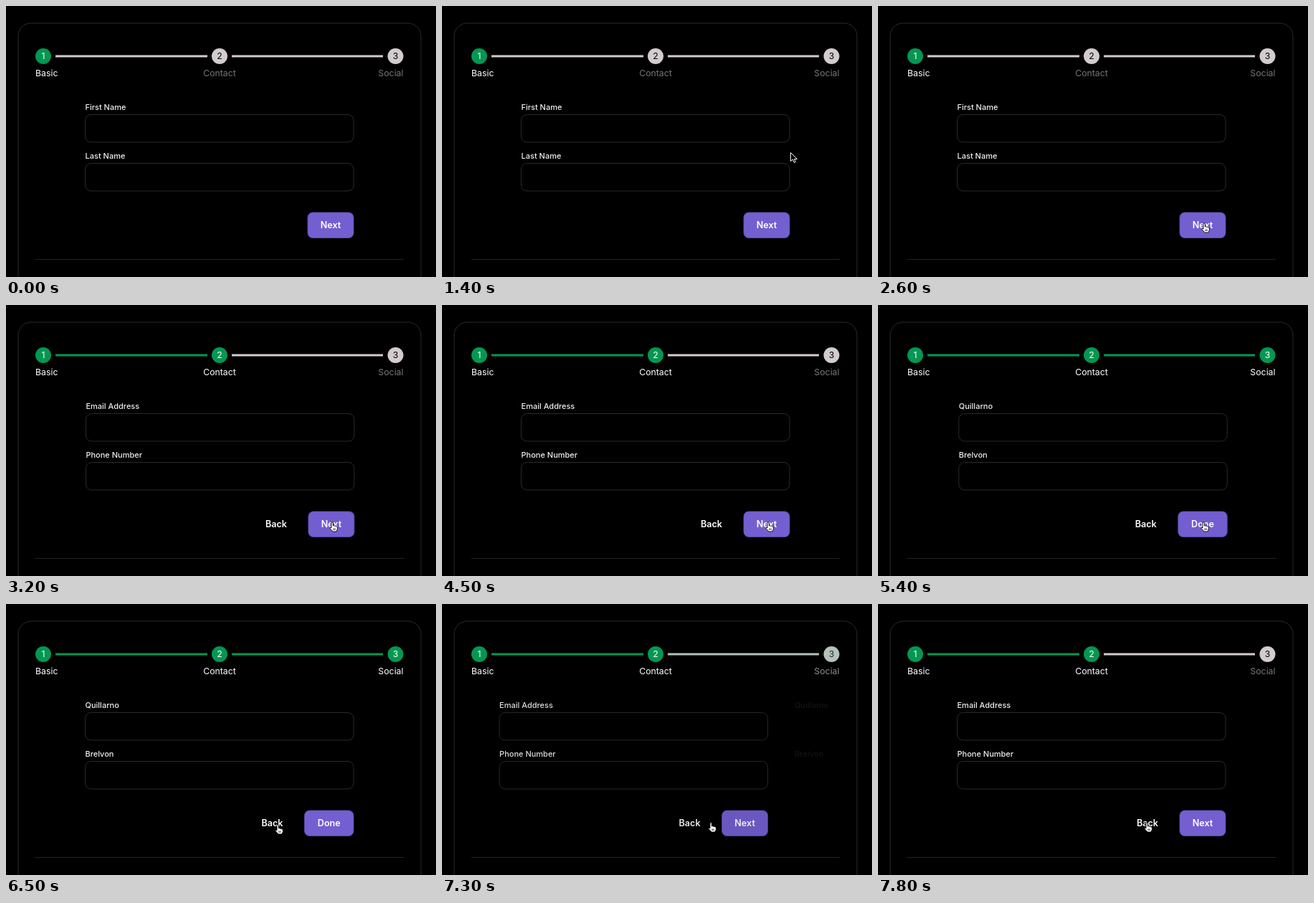
An HTML page that plays this animation: 600 by 378 pixels, repeating every 8000 ms.

```html
<!DOCTYPE html>
<html lang="en">
<head>
<meta charset="utf-8">
<title>Multi-step form</title>
<style>
  html, body { margin: 0; width: 100%; height: 100%; overflow: hidden; background: #000; }
  svg { display: block; width: 600px; height: 378px; font-family: Inter, "Open Sans", sans-serif; }
  .frame { fill: none; stroke: #2b2b2b; }
  .step { font-size: 12.3px; }
  .field { font-size: 11px; font-weight: 500; fill: #f0f0f0; }
  .button { font-size: 12.6px; font-weight: 600; fill: #fff; text-anchor: middle; }
</style>
</head>
<body>
<svg viewBox="0 0 600 378">
  <clipPath id="inside"><rect x="17.5" y="24" width="561" height="400" rx="18"/></clipPath>
  <rect class="frame" x="17" y="24" width="562" height="400" rx="18"/>
  <path d="M41 353.5H555" stroke="#242424"/>
  <g id="stepper"></g>
  <g id="panels" clip-path="url(#inside)"></g>
  <g id="cursor" stroke-linejoin="round">
    <path id="hand" fill="#fff" stroke="#000" stroke-width=".9"
      d="M3 9V2a1.2 1.2 0 0 1 2.4 0V6q1.6-1 2.2.4 1.6-.7 2.1.5 1.7-.4 1.7 1V10.5L10 14H5L1 9.6q-.4-1.6 1-1.2zM6 9.5V12M8 9.5V12"/>
    <path id="arrow" fill="#000" stroke="#fff" d="M0 0V12L3 9.5 5 14 7 13 5 9H9z"/>
  </g>
</svg>
<script>
const LOOP = 8000, SLIDE = 412, RATE = 0.017, FADE = 300;
const $ = id => document.getElementById(id);

const steps = [
  { name: "Basic", x: 52, labelX: 41, anchor: "start" },
  { name: "Contact", x: 298, labelX: 298, anchor: "middle" },
  { name: "Social", x: 543.5, labelX: 554.5, anchor: "end" },
];
const forms = [
  { fields: ["First Name", "Last Name"], next: "Next", left: 421 },
  { fields: ["Email Address", "Phone Number"], next: "Next", left: 421, back: 376 },
  { fields: ["Quillarno", "Brelvon"], next: "Done", left: 416.5, back: 371.5 },
];
// Page changes: time, page left, page entered
const moves = [[2710, 0, 1], [4970, 1, 2], [7050, 2, 1]];
// Pointer: time, x, y
const path = [[1000, 540, 56], [1700, 452, 300], [2000, 452, 300], [2100, 451, 302],
  [4970, 451, 302], [5300, 450, 302], [6000, 450, 302], [6500, 375, 307], [6800, 371, 304]];

$("stepper").innerHTML = [[69, 281], [315, 526]].map(([a, b]) =>
  `<path class="line" d="M${a} 70H${b}" stroke-width="3"/>`).join("") +
  steps.map((s, i) => `<circle cx="${s.x}" cy="70" r="11"/>
    <text class="step number" x="${s.x}" y="74.4" text-anchor="middle">${i + 1}</text>
    <text class="step name" x="${s.labelX}" y="98.3" text-anchor="${s.anchor}">${s.name}</text>`).join("");

$("panels").innerHTML = forms.map(f => `<g>
  ${f.fields.map((name, i) => `<text class="field" x="110.5" y="${145 + 68 * i}">${name}</text>
    <rect class="frame" x="110.5" y="${151.5 + 68 * i}" width="374.5" height="38.5" rx="8"/>`).join("")}
  ${f.back ? `<text class="button" x="${f.back}" y="310">Back</text>` : ""}
  <rect x="${f.left}" y="288" width="${485 - f.left}" height="35.5" rx="7" fill="#745fd0" stroke="#5e4fa6" stroke-width=".8"/>
  <text class="button" x="${(f.left + 485) / 2}" y="310">${f.next}</text></g>`).join("");

const all = selector => [...document.querySelectorAll(selector)];
const circles = all("circle"), lines = all(".line"), numbers = all(".number"), names = all(".name");
const panels = [...$("panels").children];

const clamp = v => Math.min(1, Math.max(0, v));
const lerp = (a, b, k) => a + (b - a) * k;
const mix = (a, b, k) => `rgb(${a.map((v, i) => Math.round(lerp(v, b[i], k)))})`;
const GREY = [212, 203, 205], GREEN = [4, 151, 82], DIM = [118, 118, 118], WHITE = [255, 255, 255], BLACK = [0, 0, 0];

function drawPages(t) {
  const [start, from, to] = moves.filter(m => m[0] <= t).pop() || [-LOOP, 0, 0];
  const u = (t - start) * RATE;
  const rest = (1 + u) * Math.exp(-u); // critically damped spring
  const dir = Math.sign(to - from);
  panels.forEach((p, i) => {
    const entering = i === to;
    const x = entering ? dir * SLIDE * rest : -dir * SLIDE * (1 - rest);
    p.setAttribute("transform", `translate(${x.toFixed(2)})`);
    p.setAttribute("opacity", entering ? 1 - rest : i === from ? rest : 0);
  });
  const k = clamp((t - start) / FADE);
  steps.forEach((s, i) => {
    const on = lerp(i <= from, i <= to, k);
    circles[i].setAttribute("fill", mix(GREY, GREEN, on));
    numbers[i].setAttribute("fill", mix(BLACK, WHITE, on));
    names[i].setAttribute("fill", mix(DIM, WHITE, on));
    if (i) lines[i - 1].setAttribute("stroke", mix(GREY, GREEN, on));
  });
}

function drawCursor(t) {
  const i = path.findLastIndex(p => p[0] <= t);
  $("cursor").style.display = i < 0 ? "none" : "";
  if (i < 0) return;
  const a = path[i], b = path[i + 1] || a;
  const k = clamp((t - a[0]) / (b[0] - a[0] || 1));
  const ease = k * k * (3 - 2 * k);
  const x = lerp(a[1], b[1], ease), y = lerp(a[2], b[2], ease);
  const over = y > 285 && x < 481 && (x > 412 || x < 386);
  $("cursor").setAttribute("transform", `translate(${x} ${y})`);
  $("hand").style.display = over ? "" : "none";
  $("arrow").style.display = over ? "none" : "";
}

const begin = performance.now();
function tick() {
  const t = (performance.now() - begin) % LOOP;
  drawPages(t);
  drawCursor(t);
  requestAnimationFrame(tick);
}
tick();
</script>
</body>
</html>
```
